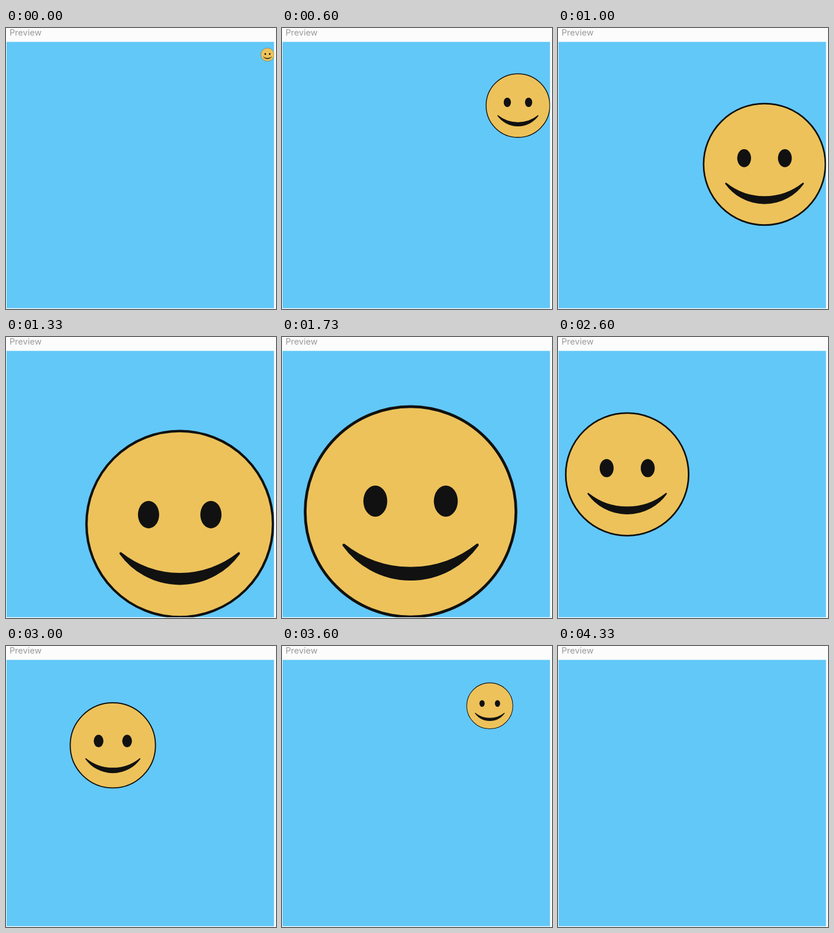
An HTML page for the animation above (5190 ms loop, 460 by 480 pixels).

```html
<!DOCTYPE html>
<html lang="en">
<head>
<meta charset="utf-8">
<title>Preview</title>
<style>
  html, body { margin: 0; width: 100%; height: 100%; overflow: hidden; background: #fcfcfc; }
  svg { display: block; width: 460px; height: 480px; }
  text { font: 400 14.6px Inter, "Open Sans", sans-serif; fill: #999; }
</style>
</head>
<body>
<svg viewBox="0 0 460 480">
  <defs><clipPath id="clip"><rect id="box" x="1" y="23.7" width="455.6" height="455"/></clipPath></defs>
  <text x="6" y="13">Preview</text>
  <use href="#box" fill="#62c8f8"/>
  <g clip-path="url(#clip)">
    <!-- face of radius 1 around the origin -->
    <g id="face" fill="#111" stroke="#111" stroke-width=".026" stroke-linejoin="round">
      <circle r=".987" fill="#edc25a"/>
      <g stroke="none">
        <ellipse cx="-.33" cy="-.1" rx=".112" ry=".146"/>
        <ellipse cx=".33" cy="-.1" rx=".112" ry=".146"/>
      </g>
      <path d="M-.625 .312A1 1 0 0 0 .625 .312A.77 .77 0 0 1 -.625 .312Z"/>
    </g>
  </g>
</svg>
<script>
const LOOP = 5190, GONE = 4330, STEP = 200 / 3;
const TOP = 22.5, RIGHT = 457, BOTTOM = 480.5;

// [time, value] pairs: the radius, and how far right the face sits in its free space
const RADIUS = [[0, 11.5], [600, 55], [1070, 115.5], [1330, 161], [1620, 183],
  [2270, 156.5], [2670, 98], [4270, 5]];
const ACROSS = [[1600, 1], [1870, 0], [2450, 0], [3000, 0.35], [3200, 0.44],
  [3730, 0.91], [4270, 1]];

const rate = ([t0, v0], [t1, v1]) => (v1 - v0) / (t1 - t0);

// Slope at a key that never overshoots its neighbours
function slope(keys, i) {
  const last = keys.length - 1;
  const a = rate(keys[Math.max(i - 1, 0)], keys[Math.max(i, 1)]);
  const b = rate(keys[Math.min(i, last - 1)], keys[Math.min(i + 1, last)]);
  return a * b > 0 ? 2 * a * b / (a + b) : 0;
}

// Smooth curve through the keys, constant outside them
function valueAt(keys, t) {
  const i = keys.findIndex(key => key[0] >= t);
  if (i < 0) return keys[keys.length - 1][1];
  if (i === 0) return keys[0][1];
  const [t0, v0] = keys[i - 1], [t1, v1] = keys[i];
  const h = t1 - t0, u = (t - t0) / h, w = 1 - u;
  return w * w * (1 + 2 * u) * v0 + u * u * (1 + 2 * w) * v1
    + h * u * w * (w * slope(keys, i - 1) - u * slope(keys, i));
}

const face = document.getElementById("face");

function draw(time) {
  const tick = Math.floor((time + 3.4) / STEP);
  const t = Math.round(tick * STEP / 10) * 10;
  face.style.display = t < GONE ? "" : "none";
  // The face drops as it grows until it rests on the floor
  const r = valueAt(RADIUS, t);
  const x = r + valueAt(ACROSS, t) * (RIGHT - 2 * r);
  const y = Math.min(TOP + 2 * r, BOTTOM - r);
  face.setAttribute("transform", `translate(${x} ${y}) scale(${r})`);
}

const start = performance.now();
function frame() {
  draw((performance.now() - start) % LOOP);
  requestAnimationFrame(frame);
}
frame();
</script>
</body>
</html>
```
